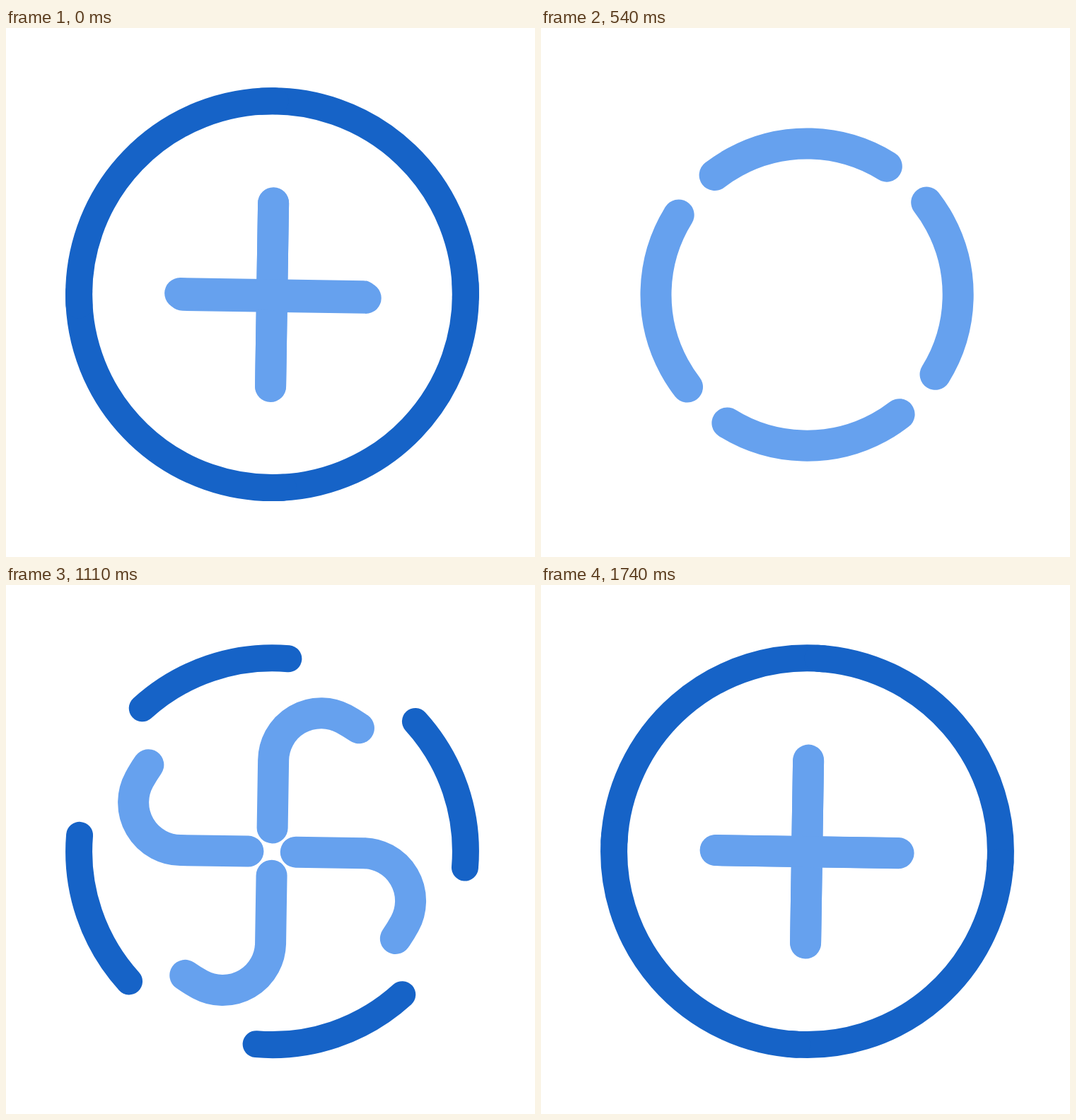
An HTML page that plays this animation: 748 px wide and 748 px high, repeating every 2860 ms.

```html
<!DOCTYPE html>
<html lang="en">
<head>
<meta charset="utf-8">
<title>Swirling plus</title>
<style>
  html, body { margin: 0; width: 100%; height: 100%; overflow: hidden; background: #fff; }
  svg { display: block; width: 100%; height: 100%; }
  path { fill: none; stroke-linecap: round; }
  .ring { stroke: #1663c7; stroke-width: 38; }
  .arm { stroke: #66a1ee; stroke-width: 44; stroke-linejoin: round; }
</style>
</head>
<body>
<svg viewBox="0 0 748 748">
  <g id="rings" transform="translate(376.5 376.7)"></g>
  <g id="arms" transform="translate(376.1 377.1) rotate(0.9)"></g>
</svg>
<script>
const LOOP = 2860, STEP = 30, END = 1740;
const RAD = Math.PI / 180;

// Angles run clockwise from the top, in degrees.
const point = (radius, angle) =>
  `${radius * Math.sin(angle * RAD)} ${-radius * Math.cos(angle * RAD)}`;

// An arm leaves its straight line, turns onto the orbit, swirls round and turns back in.
const orbit = 213.6, half = 129.5;
const turn = (orbit ** 2 - half ** 2) / (2 * orbit);
const tangent = Math.atan2(turn, half) / RAD;
const sweep = 540 - 2 * tangent;
const travel = 2 * turn * (90 + tangent) * RAD + orbit * sweep * RAD + 2 * half;

function armPath() {
  const arc = (radius, to) => `A${radius} ${radius} 0 0 0 ${to}`;
  let d = `M0 ${half}L0 ${-half}` + arc(turn, point(orbit, -tangent));
  for (let i = 1; i <= 4; i++) d += arc(orbit, point(orbit, -tangent - sweep * i / 4));
  return d + arc(turn, `0 ${half}`) + `L0 ${-half}`;
}

function addFour(parent, className) {
  return [0, 90, 180, 270].map(angle => {
    const path = document.createElementNS("http://www.w3.org/2000/svg", "path");
    path.setAttribute("class", className);
    path.setAttribute("transform", `rotate(${angle})`);
    parent.append(path);
    return path;
  });
}

const rings = addFour(document.getElementById("rings"), "ring");
const arms = addFour(document.getElementById("arms"), "arm");
const rightArm = arms[1];
for (const arm of arms) {
  arm.setAttribute("d", armPath());
  arm.setAttribute("stroke-dasharray", `${2 * half} 9999`);
}

// time, distance travelled, speed
const knots = [
  [0, 0.5, 0.35],
  [210, 206, 1.48],
  [540, 850, 2.45],
  [750, 1490, 3.2],
  [960, 2013, 1.45],
  [1260, travel - 81.5, 0.35],
  [END, travel, 0]
];

function distanceAt(time) {
  if (time >= END) return travel;
  const i = knots.findIndex(k => k[0] > time);
  const [t0, p0, v0] = knots[i - 1], [t1, p1, v1] = knots[i];
  const span = t1 - t0, u = (time - t0) / span, w = 1 - u;
  return w * w * (1 + 2 * u) * p0 + u * u * (3 - 2 * u) * p1
    + span * u * w * (w * v0 - u * v1);
}

const ringRadius = 273.4, ringRate = 0.2708;

function ringPath(distance) {
  const leaving = 94.2 - ringRate * distance;
  const arriving = 91.7 - ringRate * (travel - distance);
  const length = Math.max(leaving, arriving);
  if (length <= 0) return "";
  const from = leaving > 0 ? -3.2 : 4.8;
  const to = leaving > 0 ? from + length : from - length;
  return `M${point(ringRadius, from)}A${ringRadius} ${ringRadius} 0 0 ${to > from ? 1 : 0} ${point(ringRadius, to)}`;
}

function draw(time) {
  const distance = distanceAt(Math.floor(time / STEP) * STEP);
  const d = ringPath(distance);
  for (const ring of rings) ring.setAttribute("d", d);
  for (const arm of arms) arm.setAttribute("stroke-dashoffset", -distance);

  // The right arm starts slightly off centre and settles onto the shared orbit.
  const drift = 2.7 * Math.max(0, 1 - (distance / 850) ** 2);
  rightArm.setAttribute("transform", `translate(${drift} ${drift}) rotate(90)`);
}

const start = performance.now();
function tick() {
  draw((performance.now() - start) % LOOP);
  requestAnimationFrame(tick);
}
tick();
</script>
</body>
</html>
```
